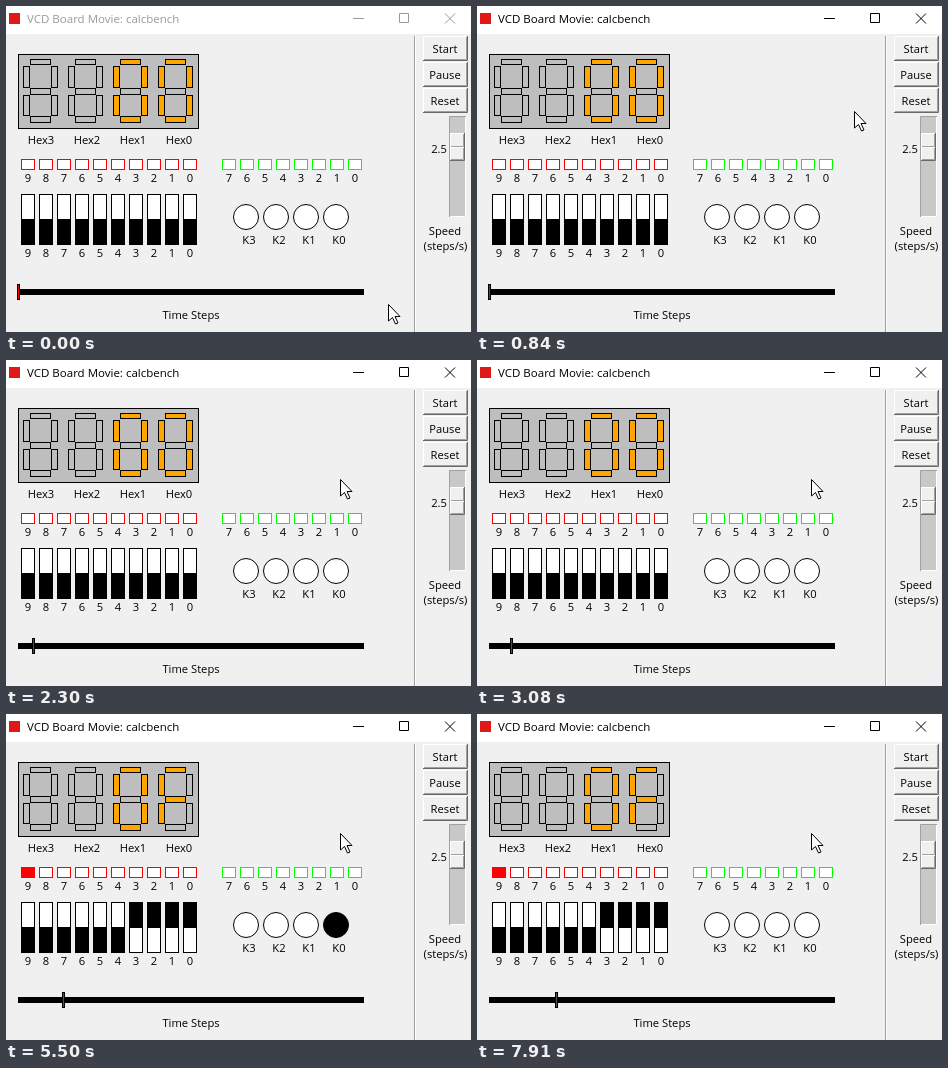
Recreate the animation shown at these times as an HTML page. Size 465x326 px, loop 8 s.

```html
<!DOCTYPE html>
<html lang="en">
<head>
<meta charset="utf-8">
<title>VCD Board Movie</title>
<style>
  html, body { margin: 0; width: 100%; height: 100%; overflow: hidden; background: #f0f0f0; }
  svg { display: block; }
  text { font: 11.2px "Open Sans", "Noto Sans", sans-serif; }
  rect { shape-rendering: crispEdges; }
</style>
</head>
<body>
<svg id="stage" width="465" height="326"></svg>
<script>
const stage = document.getElementById('stage');

function add(tag, attrs) {
  const node = document.createElementNS('http://www.w3.org/2000/svg', tag);
  set(node, attrs);
  return stage.appendChild(node);
}
function set(node, attrs) {
  for (const key in attrs) node.setAttribute(key, attrs[key]);
}
const fill = (x, y, width, height, color) => add('rect', { x, y, width, height, fill: color });
// Outlined box whose 1px border covers the pixels x0..x1 and y0..y1.
const box = (x0, y0, x1, y1, color, stroke = '#000') =>
  add('rect', { x: x0 + .5, y: y0 + .5, width: x1 - x0, height: y1 - y0, fill: color, stroke });
const path = (d, stroke, color = 'none') => add('path', { d, stroke, fill: color });
function label(str, x, y, anchor = 'middle') {
  const node = add('text', { x, y, 'text-anchor': anchor });
  node.textContent = str;
  return node;
}
// Raised panel; returns its edges so that it can be pressed.
function raised(x, y, w, h) {
  fill(x, y, w, h, '#f0f0f0');
  const r = x + w - .5, b = y + h - .5;
  return [
    path(`M${x + .5} ${b}V${y + .5}H${r}`, '#fff'),
    path(`M${x + 1} ${b - 1}H${r - 1}V${y + 1}`, '#a0a0a0'),
    path(`M${x} ${b}H${r}V${y}`, '#696969')
  ];
}

// Title bar
fill(0, 0, 465, 28, '#fff');
fill(3, 7, 11, 11, '#e01818');
const title = label('VCD Board Movie: calcbench', 21, 17, 'start');
title.style.fontSize = '11.5px';
const controls = path('M347 12.5h11M393.5 7.5h9v9h-9zM439 7.5l10 10M449 7.5l-10 10', '#000');

// Hex displays
const GRAY = '#bebebe', ORANGE = '#ffa500';
box(12, 48, 192, 122, GRAY);
const SEGMENTS = [ // a to g
  [7, 53, 27, 58], [28, 60, 34, 81], [28, 89, 34, 109], [7, 110, 27, 116],
  [0, 89, 6, 109], [0, 60, 6, 81], [7, 82, 27, 88]
];
const digits = [3, 2, 1, 0].map((n, i) => {
  const x = 17 + 45 * i;
  label('Hex' + n, 35 + 46 * i, 138);
  return SEGMENTS.map(([x0, y0, x1, y1]) => box(x + x0, y0, x + x1, y1, GRAY));
});
const show = (digit, lit) =>
  digit.forEach((seg, i) => set(seg, { fill: lit.includes('abcdefg'[i]) ? ORANGE : GRAY }));
show(digits[2], 'abcdef');

// Lamps, switches and keys
const lamps = [], levers = [], keys = [];
for (let i = 0; i < 10; i++) {
  const x = 15 + 18 * i;
  lamps.push(box(x, 153, x + 13, 163, '#fff', '#f00'));
  box(x, 188, x + 13, 238, '#fff');
  levers.push(fill(x, 213, 14, 26, '#000'));
  label(9 - i, x + 7, 176);
  label(9 - i, x + 7, 251);
}
for (let i = 0; i < 8; i++) {
  const x = 216 + 18 * i;
  box(x, 153, x + 13, 163, '#fff', '#0f0');
  label(7 - i, x + 7, 176);
}
for (let i = 0; i < 4; i++) {
  keys.push(add('circle', { cx: 240 + 30 * i, cy: 211, r: 12.5, stroke: '#000' }));
  label('K' + (3 - i), 243 + 30 * i, 238);
}

// Time line
fill(12, 283, 346, 6, '#000');
const marker = box(11, 278, 13, 293, '#f00');
label('Time Steps', 185, 313);

// Control column
fill(408, 30, 1, 296, '#a0a0a0');
fill(409, 30, 1, 296, '#fff');
const startEdges = raised(417, 30, 45, 25);
const startText = label('Start', 439, 47);
raised(417, 56, 45, 25);
label('Pause', 439, 73);
raised(417, 82, 45, 25);
label('Reset', 439, 99);
fill(443, 110, 17, 101, '#c8c8c8');
path('M443.5 211V110.5H460', '#a0a0a0');
path('M444 210.5H459.5V111', '#fff');
raised(444, 127, 15, 28);
path('M445 140.5h13', '#a0a0a0');
path('M445 141.5h13', '#fff');
label('2.5', 441, 147, 'end');
label('Speed', 439, 229);
label('(steps/s)', 439.5, 244);

// Pointer
const glow = add('circle', { cx: 442, cy: 45, r: 12, fill: '#f8e820', opacity: .65 });
const pointer = path('M.5 .5V17L4.5 13.5L7.5 20L10 19L7 12.5H12Z', '#000', '#fff');
const TRAIL = [
  [382, 298], [384, 286], [392, 242], [408, 172], [428, 105], [439, 62], [442, 48], [442, 47],
  [442, 47], [435, 58], [408, 87], [377, 105], [356, 113], [343, 117], [336, 119], [334, 119], [334, 119]
];

const TICKS = [1070, 1460, 1840, 2300, 2680, 3080, 3480, 3860, 4240, 4700,
  5100, 5500, 5880, 6260, 6730, 7130, 7510, 7910];
const LOOP = 8000;

function draw(t) {
  const move = Math.min(TRAIL.length - 1, Math.max(0, 1 + Math.floor((t - 66) / 77)));
  const active = move >= 6, pressed = active && move < 9;
  set(title, { fill: active ? '#000' : '#999' });
  set(controls, { stroke: active ? '#000' : '#999' });
  set(glow, { visibility: pressed ? 'visible' : 'hidden' });
  set(pointer, { transform: `translate(${TRAIL[move]})` });
  const edges = pressed ? ['#696969', '#f0f0f0', '#fff'] : ['#fff', '#a0a0a0', '#696969'];
  startEdges.forEach((edge, i) => set(edge, { stroke: edges[i] }));
  set(startText, { transform: pressed ? 'translate(1 1)' : '' });

  const step = TICKS.filter(tick => tick <= t).length;
  // The clock lamp alternates, holding once when the switches flip.
  const clock = step < 10 ? step % 2 : 1 - step % 2;
  set(lamps[0], { fill: clock ? '#f00' : '#fff' });
  set(marker, { x: Math.round(10.7 + 3.74 * step) + .5, fill: clock ? '#555' : '#f00' });
  levers.forEach((lever, i) => set(lever, { y: step >= 10 && i > 5 ? 188 : 213 }));
  const held = step === 11 || step === 12 ? 3 : step === 15 || step === 16 ? 2 : -1;
  keys.forEach((key, i) => set(key, { fill: i === held ? '#000' : '#fff' }));
  show(digits[3], step >= 12 ? 'aefg' : 'abcdef');
}

const begin = performance.now();
function loop() {
  draw((performance.now() - begin) % LOOP);
  requestAnimationFrame(loop);
}
loop();
</script>
</body>
</html>
```
